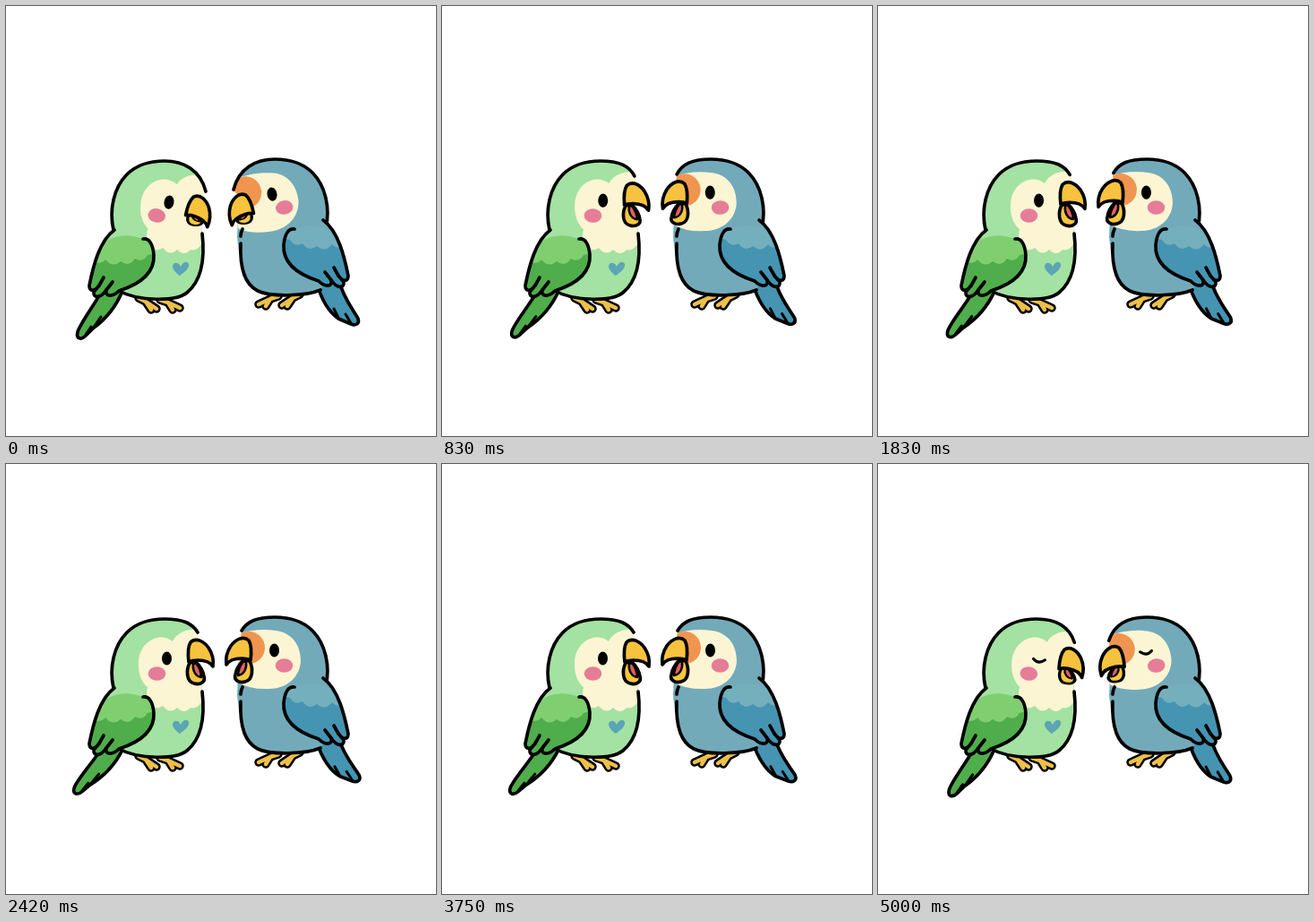
Write an HTML page that moves like this. It is 480 px wide and 480 px high and loops after 5.08 s.

```html
<!DOCTYPE html>
<html>
<head>
<meta charset="utf-8">
<style>
  html, body { margin: 0; width: 100%; height: 100%; overflow: hidden; background: #fff }
  svg { display: block; width: 100vw; height: 100vh }
  .line { fill: none; stroke: #000; stroke-width: 3.7; stroke-linecap: round; stroke-linejoin: round }
  .thin { stroke-width: 3 }
</style>
</head>
<body>
<svg id="stage" viewBox="0 0 480 480"></svg>
<script>
const LOOP = 5080, STEPS = 61, BEATS = 5, BLINK = 50;
const stage = document.getElementById('stage');

const green = {
  id: 'green', place: '', body: '#a3e2a2', wing: '#7fcf70', dark: '#50ad4b', swing: 6,
  face: `<path d="M218 250L219 185C205 183 191 187 186 198C172 187 150 197 148 220C147 237 153 246 161 252L205 262Z"/>`,
  bib: `<path d="M160 246Q154 255 160 266Q166 276 175 270Q183 280 191 272Q199 280 206 272Q213 274 218 266V230Z"/>`,
  throat: 'M219 254', side: 'C222 280 219 306 202 320C190 330 148 330 126 318',
  tail: 'M108 316C100 332 83 354 80 364C78 372 84 373 89 368L97 360C108 352 122 338 130 318',
  vanes: 'M89 367L95 358M97 360L106 347',
  wingAt: '', feetAt: 'translate(-2 0)', faceAt: [0, 0], patternY: -2,
  extra: `<path fill="#5ba5b4" d="M194 301C188 297 184 291 187 288C190 285 194 288 195 291C197 286 202 284 204 288C205 293 199 297 194 301Z"/>`
};

const blue = {
  id: 'blue', place: 'translate(477 -2) scale(-1 1)', body: '#73aaba', wing: '#74afbe', dark: '#4594b2', swing: 3,
  face: `<path d="M218 246V192C204 187 190 186 176 188C158 190 148 204 148 222C149 241 165 253 183 253Q204 254 218 246Z"/>
    <circle cx="206" cy="207" r="18" fill="#f0954f"/>`,
  bib: '',
  throat: 'M213 251Q215 255 215 259M215 267', side: 'C216 290 212 312 196 320C182 327 142 326 126 319',
  tail: 'M106 306C101 328 88 343 84 351C82 357 87 359 92 357L106 351C116 344 124 332 130 312',
  vanes: 'M92 356L98 346M106 350L111 340',
  wingAt: 'translate(2 -9)', feetAt: 'translate(-1 -2)', faceAt: [-2, -7], patternY: -8,
  extra: ''
};

const line = (d, fill = 'none', kind = '') => `<path class="line ${kind}" d="${d}" style="fill:${fill}"/>`;

function beak(shut) {
  return `<g transform="translate(204 ${222 + 10 * shut}) scale(${1 - .15 * shut} ${1 - .45 * shut}) translate(-203 -222)">
      ${line('M204 222C200 230 200 243 209 245C216 247 222 243 220 237C219 230 215 225 211 221Z', '#f5c63f')}
      <path class="line" style="fill:#e0625f;stroke-width:2.5" d="M208 223C207 230 210 237 217 238C217 231 214 226 211 222Z"/>
    </g>
    <g transform="translate(0 ${13 * shut}) rotate(${18 * shut} 204 210)">
      ${line('M204 221C203 213 203 204 206 199C212 193 221 198 226 205C230 211 232 219 231 226C228 221 221 219 214 219Q208 219 204 221Z', '#f7c33e')}
    </g>`;
}

function feet(at) {
  const d = 'M150 326L158 330L164 339M158 330L170 338M174 328L183 331L188 339M183 331L196 337';
  return `<g transform="${at}">
    <path class="line" style="stroke-width:9.500" d="${d}"/>
    <path class="line" style="stroke:#ecc04a;stroke-width:4.500" d="${d}"/></g>`;
}

function wing(b) {
  const edge = 'M121 250C104 262 97 292 93 312C93 319 99 319 104 312L98 319C97 327 106 326 112 317' +
    'C110 325 119 325 126 318C151 310 166 297 165 278C164 266 160 259 153 260';
  return `<g transform="${b.wingAt}">
    <clipPath id="${b.id}-wing"><path d="${edge}Q130 251 110 263Z"/></clipPath>
    <path fill="${b.body}" d="${edge}Z"/>
    <g clip-path="url(#${b.id}-wing)">
      <path fill="${b.wing}" d="M85 240h90v95h-90Z"/>
      <path fill="${b.dark}" transform="translate(0 ${b.patternY})"
        d="M90 282Q103 294 111 285Q119 295 128 287Q137 294 144 284Q152 289 158 280L172 276V345H85Z"/>
    </g>
    ${line(edge)}${line('M104 312L109 303M112 317L119 308')}</g>`;
}

function bird(b, shut, asleep, sway) {
  const head = 'M120 250C115 228 120 203 135 188C146 177 160 173 177 173' +
    `C198 173 ${208 + 9 * shut} ${178 + 5 * shut} ${214 + 9 * shut} ${188 + 19 * shut}`;
  const eye = asleep
    ? line('M172 217Q178 223 185 217', 'none', 'thin')
    : `<ellipse cx="179.5" cy="217" rx="5.5" ry="7.6"/>`;
  const [faceX, faceY] = b.faceAt;
  return `<g transform="${b.place}">
    <g transform="rotate(${b.swing * sway} 116 318)">${line(b.tail, b.dark)}${line(b.vanes, 'none', 'thin')}</g>
    ${feet(b.feetAt)}
    <clipPath id="${b.id}-body"><path d="${head}L217 215L219 260${b.side}L110 290Z"/></clipPath>
    <g clip-path="url(#${b.id}-body)">
      <path fill="${b.body}" d="M90 160h150v180h-150Z"/>
      <g fill="#fbf5d4">${b.bib}<g transform="translate(${2 * shut} 0) rotate(${6 * shut} 175 226)">${b.face}</g></g>
    </g>
    ${b.extra}
    <g transform="translate(${faceX + shut} ${faceY + shut}) rotate(${10 * shut} 174 226)">
      <ellipse cx="168.5" cy="234" rx="9.8" ry="7.8" fill="#e67d98"/>${eye}
    </g>
    ${line(head)}${line(b.throat + b.side)}
    ${wing(b)}
    ${beak(shut)}</g>`;
}

let shown = -1;
function draw(now) {
  const step = Math.floor((now % LOOP + 5) * STEPS / LOOP) % STEPS;
  if (step !== shown) {
    shown = step;
    const beat = step * BEATS / STEPS % 1;
    const shut = 1 - Math.min(1, Math.min(beat, 1 - beat) / .2);
    const sway = (1 - Math.cos(2 * Math.PI * (beat - .03))) / 2;
    stage.innerHTML = [green, blue].map(b => bird(b, shut, step >= BLINK, sway)).join('');
  }
}

let start;
function tick(now) {
  start ??= now;
  draw(now - start);
  requestAnimationFrame(tick);
}
draw(0);
requestAnimationFrame(tick);
</script>
</body>
</html>
```
